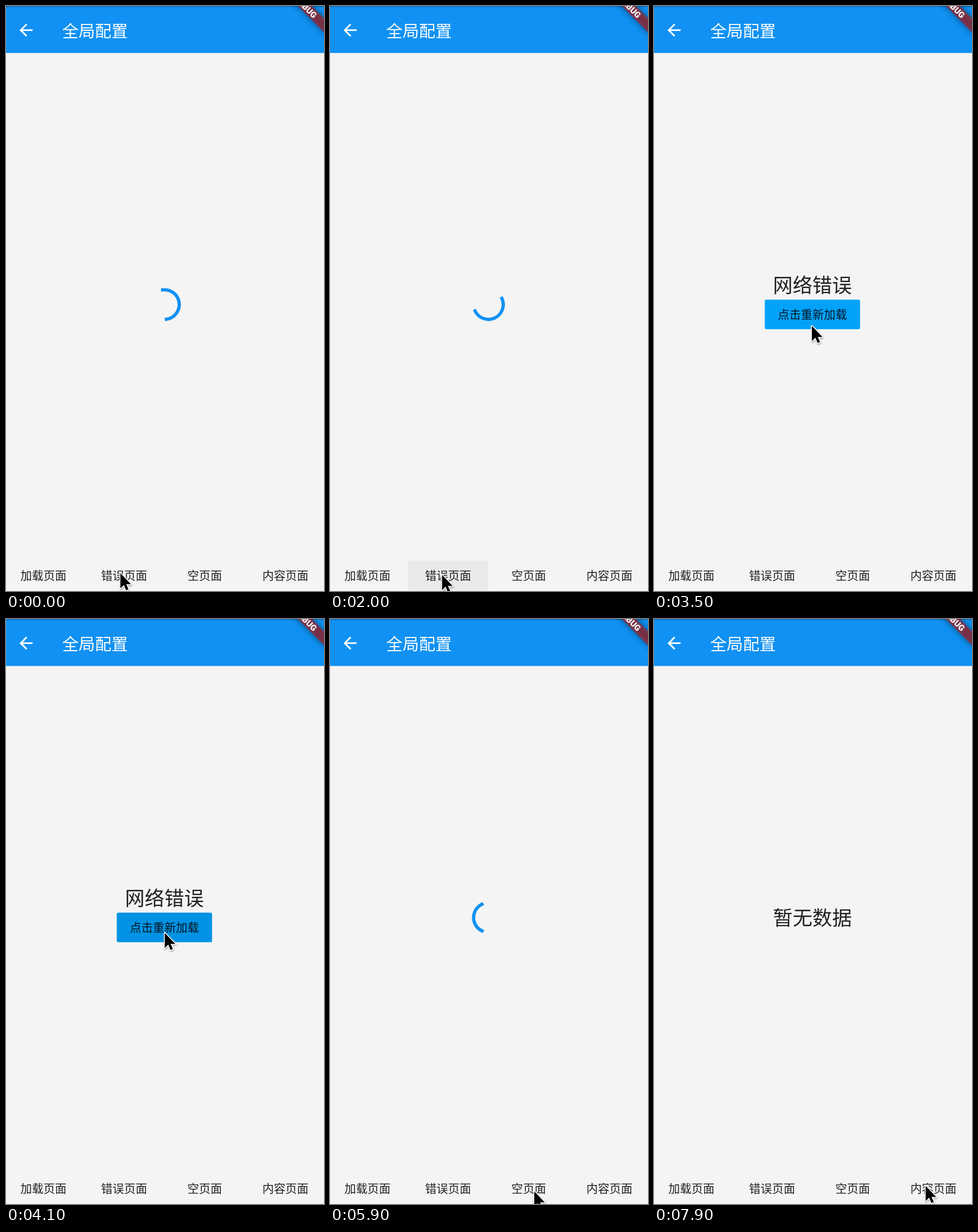
Write an HTML page that moves like this. It is 552 px wide and 1015 px high and loops after 8 s.

```html
<!DOCTYPE html>
<html lang="zh-CN">
<head>
<meta charset="utf-8">
<title>全局配置</title>
<style>
  html, body { margin: 0; width: 100%; height: 100%; overflow: hidden; background: #f4f4f4; }
  svg { display: block; width: 100%; height: 100%; }
  text {
    font-family: "Noto Sans CJK SC", "Noto Sans CJK", "Noto Sans CJK JP", sans-serif;
    fill: rgba(0, 0, 0, .87);
    text-anchor: middle;
  }
  .label { font-size: 20px; }
  .headline { font-size: 34.2px; }
  .title { font-size: 28.5px; fill: #fff; }
  .banner { font: 900 14.5px Roboto, sans-serif; fill: #fff; }
  .press { fill: #000; opacity: 0; }
  #ring { fill: none; stroke: #1191f3; stroke-width: 5.7; stroke-linecap: square; }
</style>
</head>
<body>
<svg viewBox="0 0 552 1015">
  <defs>
    <filter id="blur" x="-50%" y="-200%" width="200%" height="500%">
      <feGaussianBlur stdDeviation="5.6"/>
    </filter>
    <filter id="drop" x="-50%" y="-50%" width="200%" height="200%">
      <feDropShadow dx="0.5" dy="1.5" stdDeviation="1.3" flood-opacity=".4"/>
    </filter>
    <rect id="stripe" x="-57" y="39.9" width="114" height="17.1"/>
    <rect id="button" x="192.3" y="509.5" width="165.4" height="51.2" rx="2.8"/>
  </defs>

  <rect width="552" height="1015" fill="#f4f4f4"/>

  <rect width="552" height="81.5" fill="#1191f3"/>
  <rect width="552" height="1.7" opacity=".25"/>
  <path transform="translate(17.8 24.8) scale(1.426)" fill="#fff"
    d="M20 11H7.83l5.59-5.59L12 4l-8 8 8 8 1.41-1.41L7.83 13H20z"/>
  <text class="title" x="154.5" y="54">全局配置</text>

  <g transform="translate(555 -32.2) rotate(45)">
    <use href="#stripe" opacity=".5" filter="url(#blur)"/>
    <use href="#stripe" fill="#b71c1c" fill-opacity=".627"/>
    <text class="banner" y="53.6">DEBUG</text>
  </g>

  <g id="loading">
    <circle id="ring" r="25.7" pathLength="360"/>
  </g>

  <g id="error">
    <text class="headline" x="275" y="496.8">网络错误</text>
    <use href="#button" fill="#02a2fb"/>
    <use href="#button" id="retryPress" class="press"/>
    <text class="label" x="275" y="542.5">点击重新加载</text>
  </g>

  <g id="empty">
    <text class="headline" x="275" y="530.8">暂无数据</text>
  </g>

  <rect id="errorPress" class="press" x="135" y="962.4" width="140" height="51.2" rx="2.8"/>
  <rect id="emptyPress" class="press" x="275" y="962.4" width="140" height="51.2" rx="2.8"/>
  <g id="tabs"></g>

  <g id="cursor" filter="url(#drop)">
    <path transform="scale(1.65)" d="M0 0V16L3.7 12.4 6.1 18 8.6 17 6.2 11.6H11.2Z"
      stroke="#fff" stroke-width="1.8" stroke-linejoin="round" paint-order="stroke"/>
  </g>
</svg>
<script>
  const LOOP = 8000, STEP = 100;
  const SHOW_ERROR = 2100, RELOAD = 4220, SHOW_EMPTY = 6300;
  const RING_AGE = 3213;
  const $ = id => document.getElementById(id);

  const HOME = { x: 198.5, y: 984 };
  const MOVES = [
    { from: 0, to: 600, x: 180.5, y: 992 },
    { from: 1200, to: 1700, x: 194.5, y: 987 },
    { from: 2700, to: 3400, x: 274, y: 555 },
    { from: 3900, to: 4100, x: 275.5, y: 544.5 },
    { from: 4800, to: 5580, x: 354.5, y: 993 },
    { from: 6700, to: 7300, x: 471.5, y: 983.5 }
  ];

  const clamp = v => Math.min(1, Math.max(0, v));
  const mix = (a, b, k) => a + (b - a) * k;
  const smooth = k => k * k * (3 - 2 * k);

  function pointerAt(t) {
    return MOVES.reduce((p, m) => {
      const k = smooth(clamp((t - m.from) / (m.to - m.from)));
      return { x: mix(p.x, m.x, k), y: mix(p.y, m.y, k) };
    }, HOME);
  }

  // cubic-bezier(.4, 0, .2, 1), solved by bisection
  function ease(x) {
    if (x <= 0 || x >= 1) return clamp(x);
    let lo = 0, hi = 1, s;
    for (let i = 0; i < 24; i++) {
      s = (lo + hi) / 2;
      const r = 1 - s;
      if (1.2 * r * r * s + .6 * r * s * s + s * s * s < x) lo = s; else hi = s;
    }
    return 3 * (1 - s) * s * s + s * s * s;
  }

  // The arc grows, then shrinks, once a second; each turn starts 144 degrees back
  function drawRing(age) {
    const turn = Math.floor(age / 1000), phase = age / 1000 - turn;
    const head = ease(phase * 2) * 270, tail = ease(phase * 2 - 1) * 270;
    const start = -90 + tail + phase * 306 - (turn % 5) * 144;
    $('ring').setAttribute('transform', `translate(275 518) rotate(${start})`);
    $('ring').setAttribute('stroke-dasharray', `${Math.max(head - tail, .1)} 720`);
  }

  // Darkens for 200 ms before the release, then fades out
  function drawPress(id, t, release, depth) {
    const level = clamp((t - release + 300) / 200) * clamp(1 - (t - release) / 250);
    $(id).style.opacity = level * depth;
  }

  function show(id, on) {
    $(id).style.display = on ? '' : 'none';
  }

  function draw(t) {
    const error = t >= SHOW_ERROR && t < RELOAD, empty = t >= SHOW_EMPTY;
    show('error', error);
    show('empty', empty);
    show('loading', !error && !empty);
    drawRing(t < RELOAD ? t + RING_AGE : t - RELOAD);
    drawPress('errorPress', t, SHOW_ERROR, .042);
    drawPress('retryPress', t, RELOAD, .1);
    drawPress('emptyPress', t, SHOW_EMPTY, .042);
    const { x, y } = pointerAt(t);
    $('cursor').setAttribute('transform', `translate(${x} ${y})`);
  }

  $('tabs').innerHTML = ['加载页面', '错误页面', '空页面', '内容页面']
    .map((name, i) => `<text class="label" x="${65 + 140 * i}" y="995.5">${name}</text>`)
    .join('');

  const begin = performance.now();
  function tick() {
    const t = (performance.now() - begin) % LOOP;
    draw(Math.floor(t / STEP) * STEP);
    requestAnimationFrame(tick);
  }
  tick();
</script>
</body>
</html>
```
